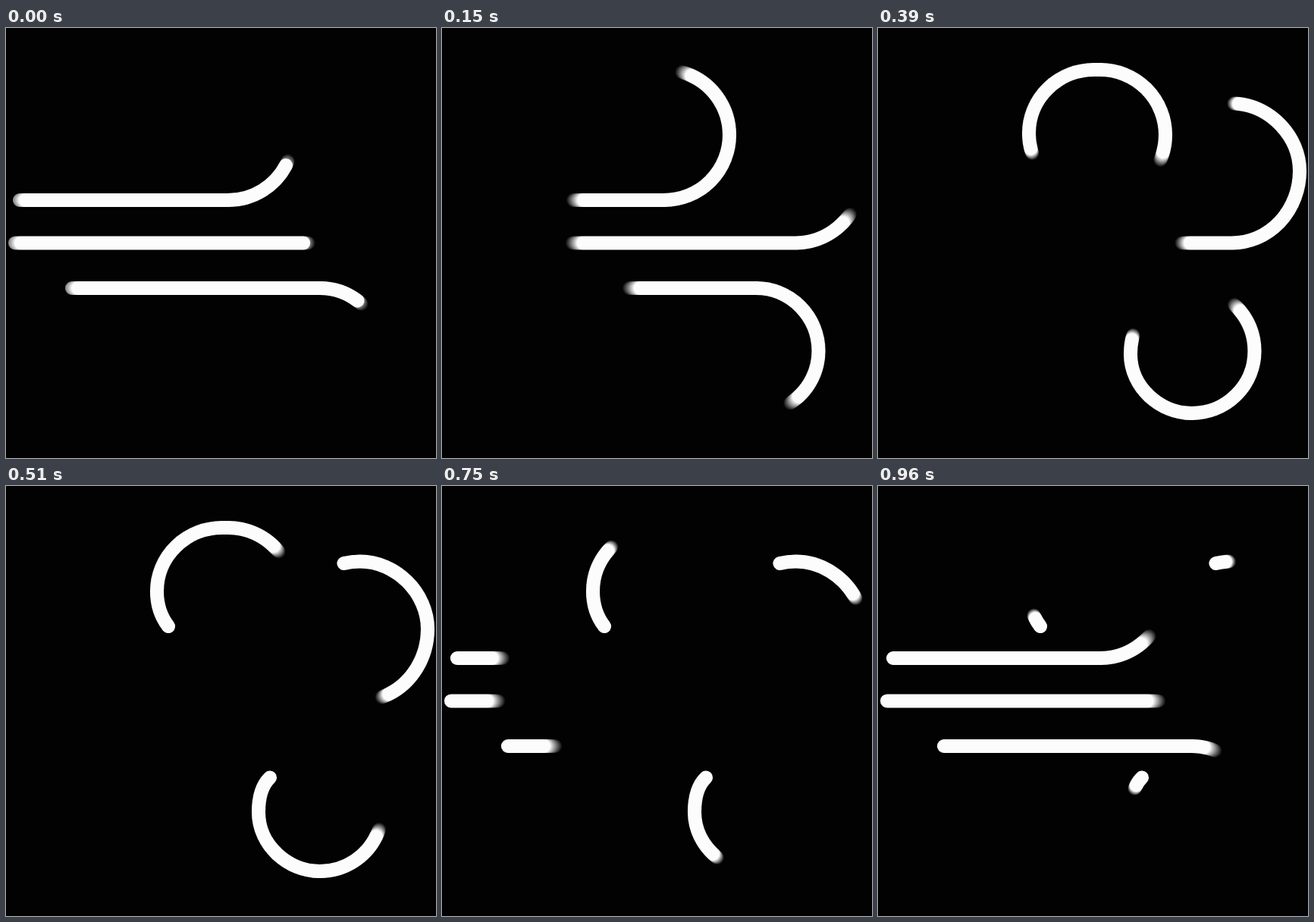
These frames come from a looping animation (567x567 px, 0.99 s). An HTML page with a canvas:

```html
<!DOCTYPE html>
<html lang="en">
<head>
<meta charset="utf-8">
<title>Wind</title>
<style>
  html, body { margin: 0; width: 100%; height: 100%; overflow: hidden; background: #020202; }
  canvas { display: block; width: 100vmin; height: 100vmin; }
</style>
</head>
<body>
<canvas id="stage" width="567" height="567"></canvas>
<script>
const ctx = document.getElementById('stage').getContext('2d', { alpha: false });
const LOOP = 990, STEP = 30;
const SHUTTER = 15, SAMPLES = 25; // motion blur exposure in ms

const makePath = d => {
  const el = document.createElementNS('http://www.w3.org/2000/svg', 'path');
  el.setAttribute('d', d);
  return { shape: new Path2D(d), length: el.getTotalLength() };
};

const upper = 'H293 A86 86 0 0 0 293 55 H285 A86 84 0 0 0 199 139 C199 156 204 172 214 185';
const middle = makePath('M12 283.4 H467 A89 95 0 0 0 556 188.5 C556 141 514 99.5 467 99.5 Q456 99.5 445.5 102');
const lower = makePath('M87 343 H414 A82.5 83 0 0 1 496.5 426 A82.5 82 0 0 1 414 508 ' +
  'C371 508 333 473 333 430 C333 411 338 394 348 384.5');
const leaving = [makePath('M18 227 ' + upper), middle, lower];
const arriving = [makePath('M20 227 ' + upper), middle, lower];

// Cubic ease between two times with relative entry and exit speeds
const ease = (start, end, from, to, speedIn, speedOut) => t => {
  const x = Math.min(1, Math.max(0, (t - start) / (end - start))), w = 1 - x;
  return from + (to - from) * (x * x * (3 - 2 * x) + speedIn * x * w * w - speedOut * x * x * w);
};

const tail = ease(0, LOOP, 0, .995, 1.55, .49);
const head = ease(0, LOOP / 2, .5, 1, 1.2, 0);
const nextHead = ease(LOOP * 2 / 3, LOOP, 0, .5, 0, .73);

function trim({ shape, length }, from, to) {
  if (to - from < .0005) return;
  ctx.setLineDash([(to - from) * length, 2 * length]);
  ctx.lineDashOffset = -from * length;
  ctx.stroke(shape);
}

function draw(time) {
  ctx.globalCompositeOperation = 'source-over';
  ctx.fillStyle = '#020202';
  ctx.fillRect(0, 0, 567, 567);
  ctx.globalCompositeOperation = 'lighter';
  ctx.strokeStyle = 'rgb(10, 10, 10)';
  ctx.lineWidth = 18;
  ctx.lineCap = 'round';
  for (let i = 0; i < SAMPLES; i++) {
    const t = time + ((i + .5) / SAMPLES - .5) * SHUTTER;
    for (const p of leaving) trim(p, tail(t), head(t));
    for (const p of arriving) trim(p, 0, nextHead(t));
  }
}

const start = performance.now();
let shown = -1;
function tick() {
  const t = Math.max(0, performance.now() - start) % LOOP;
  const time = Math.floor(t / STEP) * STEP;
  if (time !== shown) draw(shown = time);
  requestAnimationFrame(tick);
}
tick();
</script>
</body>
</html>
```
